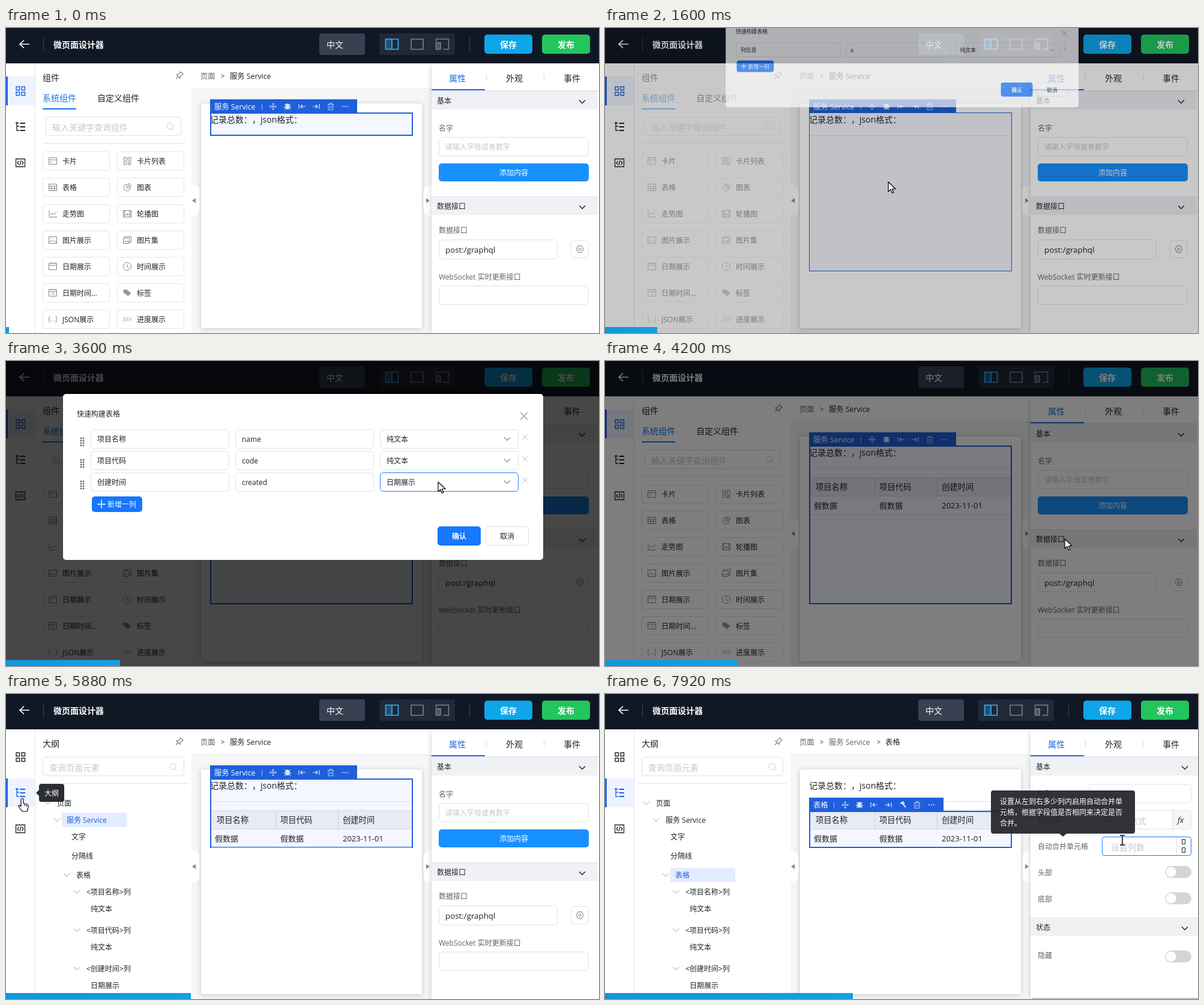
Write an HTML page that moves like this. It is 988x509 px and loops after 8 s.

```html
<!DOCTYPE html>
<html lang="zh">
<head>
<meta charset="utf-8">
<style>
html,body{margin:0;width:100%;height:100%;overflow:hidden;background:#fff}
svg{display:block;width:988px;height:509px;font-family:"Open Sans","Noto Sans CJK SC","Noto Sans CJK",sans-serif;text-spacing-trim:space-all}
</style>
</head>
<body>
<svg id="stage" viewBox="0 0 988 509" xmlns="http://www.w3.org/2000/svg">
  <defs>
    <filter id="soft" x="-10%" y="-10%" width="120%" height="120%"><feDropShadow dx="0" dy="1" stdDeviation="4" flood-opacity=".2"/></filter>
    <linearGradient id="bar"><stop offset="0" stop-color="#1296db"/><stop offset="1" stop-color="#139fe6"/></linearGradient>
  </defs>
</svg>
<script>
const LOOP = 8000, BLUE = '#1f5fdc', INK = '#1f2329', GREY = '#606266', HINT = '#c4c8d0', EDGE = '#dfe1e6';

// Drawing helpers: text is placed by its vertical centre
const rect = (x, y, w, h, fill, more = '') => `<rect x="${x}" y="${y}" width="${w}" height="${h}" fill="${fill}" ${more}/>`;
const box = (x, y, w, h, stroke = EDGE, fill = '#fff', r = 4) =>
  rect(x + .5, y + .5, w - 1, h - 1, fill, `stroke="${stroke}" rx="${r}"`);
const line = (d, stroke = INK, width = 1, more = '') =>
  `<path d="${d}" fill="none" stroke="${stroke}" stroke-width="${width}" ${more}/>`;
const shape = (d, fill, more = '') => `<path d="${d}" fill="${fill}" ${more}/>`;
const dot = (x, y, r, fill, more = '') => `<circle cx="${x}" cy="${y}" r="${r}" fill="${fill}" ${more}/>`;
const text = (x, y, s, size = 12, fill = INK, more = '') =>
  `<text x="${x}" y="${y + size * .4}" font-size="${size}" fill="${fill}" ${more}>${s.replace(/</g, '&lt;')}</text>`;
const centred = (x, y, s, size, fill, more = '') => text(x, y, s, size, fill, 'text-anchor="middle" ' + more);
const at = (x, y, s, more = '') => `<g transform="translate(${x} ${y})" ${more}>${s}</g>`;
const fade = (o, s) => o <= 0 ? '' : `<g opacity="${o.toFixed(3)}">${s}</g>`;
const chevron = (x, y, c = INK, w = 1.5, r = 5) => line(`M${x - r} ${y - r / 2}l${r} ${r}l${r} ${-r}`, c, w);

// Timing helpers
const ramp = (t, a, b) => Math.max(0, Math.min(1, (t - a) / (b - a)));
const within = (t, a, b) => t >= a && t < b;

function header() {
  return rect(0, 0, 988, 59, '#111825') +
    line('M39 27H24M30 20.5l-7 6.500 7 6.500', '#fff', 1.7) + line('M62.500 15v24', '#3b4351') +
    text(79, 27, '微页面设计器', 14, '#fff', 'font-weight="700"') +
    rect(522, 9, 76, 36, '#374151', 'rx="4"') + text(534, 27, '中文', 14, '#fff') +
    rect(622, 9, 126, 36, '#1f2937', 'rx="4"') +
    rect(633, 19, 10, 16, '#1e4f78') + line('M632.500 18.500h21v17h-21zM643 18.500v17', '#3cb2f5', 1.6) +
    line('M675 18.500h20v17h-20z', '#7b828e', 1.6) +
    rect(717, 25, 7, 10, '#4b5563') + line('M716.500 23v-4.500h21v17h-9M716.500 24.500h7.500v11h-7.500z', '#7b828e', 1.5) +
    line('M772.500 15v24', '#3b4351') +
    [[797, '#0ea5e9', '保存'], [893, '#22c55e', '发布']].map(([x, c, s]) =>
      rect(x, 11, 80, 32, c, 'rx="5"') + centred(x + 40, 27, s, 14, '#fff', 'font-weight="700"')).join('');
}

function rail(outline) {
  const y = outline ? 141 : 81, a = outline ? INK : BLUE, b = outline ? BLUE : INK;
  return rect(0, 59, 309, 450, '#fff') + rect(0, y, 48, 48, '#eef3ff') + rect(0, y, 3, 48, '#2563eb') +
    line('M48.500 59v450', '#e4e6ea') +
    line('M17 98h5.500v5.500h-5.500zM26 98h5.500v5.500h-5.500zM17 107h5.500v5.500h-5.500zM26 107h5.500v5.500h-5.500z', a, 1.4) +
    line('M18 158v13h4M18 164h4', b, 1.3) + line('M16 158.500h5M23.500 159h8.500M23.500 165h8.500M23.500 171h8.500', b, 2.2) +
    line('M16.500 218.500h15v13h-15zM21.500 222l-2.500 3 2.500 3M26.500 222l2.500 3-2.500 3M25 221l-2 8', INK, 1.3) +
    at(289, 79, line('M-6 6l4-4M-5-1l6 6 1-4 4-3-4-4-3 4z', '#777', 1.1));
}

const FRAME = 'M.500 1.500h13v11h-13z';
const ICONS = {
  卡片: FRAME + 'M.500 5h13M3 8.500h3',
  卡片列表: 'M1 1h5v5h-5zM8.500 1h4.500v7h-4.500zM1 8.500h5v4.500h-5zM8.500 10.500h4.500v2.500h-4.500z',
  表格: FRAME + 'M.500 5h13M.500 8.700h13M5 5v7.500M9.500 5v7.500',
  图表: 'M6 2a5.500 5.500 0 1 0 6 6h-6zM8.500.700a5 5 0 0 1 5 5h-5z',
  走势图: 'M1 1v11.500h13M3 9.500l3-3.500 3 2 4-4.500',
  轮播图: FRAME + 'M3 1.500v11M11 1.500v11M5 9l2-3 2 3zM0 4h3M0 9h3M11 4h3M11 9h3',
  图片展示: FRAME + 'M1 11l4-4 3 3 2.500-2 3 3M4 4.500h1',
  图片集: 'M.500 3.500h10v9h-10zM3 3.500v-2.500h10.500v9h-3M1 11l3-3 2 2 2-2 2 3',
  日期展示: FRAME + 'M.500 5h13M4 0v3M10 0v3',
  时间展示: 'M7 .500a6.500 6.500 0 1 0 .01 0zM7 3.500v4l3 1.500',
  '日期时间...': FRAME + 'M.500 5h13M4 0v3M10 0v3M7 6.500v3h2.500',
  标签: 'M.500 1.500h6l7 6-5 5-8-6z',
  JSON展示: 'M2.500 2q-1.500 0-1.500 2v1.500L0 7l1 1.500v2q0 2 1.500 2M11.500 2q1.500 0 1.500 2v1.500L14 7l-1 1.500v2q0 2-1.500 2M3.500 9h1M6.500 9h1M9.500 9h1',
  进度展示: 'M0 3.500l3.500 3.500L0 10.500M5 3.500l3.500 3.500L5 10.500M10 3.500l3.500 3.500-3.500 3.500'
};
const card = (x, y, name, edge = '#e3e5e9') => box(x, y, 112, 32, edge) +
  at(x + 10, y + 9, name === '标签' ? shape(ICONS[name], '#999') : line(ICONS[name], '#82868c')) + text(x + 33, y + 16.300, name);
const search = (x, w, hint) => box(x, w > 230 ? 105 : 148, w, 32) + text(x + 11, w > 230 ? 122 : 165, hint, 14, HINT) +
  at(x + w - 19, w > 230 ? 121 : 164, line('M0-5a5 5 0 1 0 .01 0M4 4l2.500 2.500', HINT));

const palette = () => text(61, 82, '组件', 14) + text(61, 116, '系统组件', 14, '#1677e8') + rect(61, 134, 56, 2, '#1677e8') +
  text(152, 116, '自定义组件', 14) + search(66, 226, '输入关键字查询组件') + line('M61 192.500h237', EDGE) +
  Object.keys(ICONS).map((n, i) => card(61 + i % 2 * 124, 206 + (i >> 1) * 44, n)).join('');

const treeRow = ([x, y, s, open], marked) => (marked ? rect(x - 8, y - 12, 108, 24, '#e3edff') : '') +
  (open ? chevron(x - 16, y, '#9a9da3', 1) : '') + text(x, y, s, 12, marked ? BLUE : INK);
const TREE = [[85, 182, '页面', 1], [101, 210, '服务 Service', 1], [109, 238, '文字'], [109, 270, '分隔线'], [117, 302, '表格', 1],
  ...['项目名称', '项目代码', '创建时间'].flatMap((s, i) =>
    [[134, 330 + i * 64, `<${s}>列`, 1], [141, 358 + i * 64, i < 2 ? '纯文本' : '日期展示']])];
const outlineTop = text(61, 82, '大纲', 14) + search(61, 236, '查询页面元素') + line('M55 149.500h248', EDGE);
const outline = marked => outlineTop + TREE.map(r => treeRow(r, r[2] === marked)).join('');
const dropOutline = () => outlineTop + text(61, 177, '将目标拖入导航中的节点可以切换容器', 14, '#79b59c') +
  [[85, 219, '页面', 1], [101, 247, '内容区', 1], [117, 275, '服务 Service', 1], [133, 303, '内容区', 1]]
    .map((r, i) => treeRow(r, i > 1)).join('');

const TOOLS = {
  move: line('M-5 0h10M0-5v10M-2-3.500l2-2 2 2M-2 3.500l2 2 2-2M-3.500-2l-2 2 2 2M3.500-2l2 2-2 2', '#dce7ff'),
  bug: line('M-5-4l3 2M5-4l-3 2M-6 1h12M-5 5l3-2M5 5l-3-2', '#dce7ff', 1.3) + '<ellipse rx="3.500" ry="5" fill="#dce7ff"/>',
  first: line('M-5-4v8M6 0h-8M1-3l-3 3 3 3', '#dce7ff', 1.2),
  last: line('M5-4v8M-6 0h8M-1-3l3 3-3 3', '#dce7ff', 1.2),
  hammer: line('M-4-2l4-3 3 3M-1-3l6 7', '#dce7ff', 2),
  bin: line('M-5-3.500h10M-2-3.500v-2h4v2M-4-3.500v9h8v-9M-1.500-1v4M1.500-1v4', '#b9cdfa'),
  more: dot(-4, 0, 1, '#dce7ff') + dot(0, 0, 1, '#dce7ff') + dot(4, 0, 1, '#dce7ff')
};
function toolbar(y, label, width, tools = 'move bug first last bin more') {
  const names = tools.split(' '), start = 375 + width;
  return rect(340, y, start - 320 + 24 * (names.length - 1), 23, BLUE) + text(347, y + 12, label, 12.3, '#fff') +
    line(`M${start - 18.500} ${y + 8}v10`, '#8fb0f5') + names.map((n, i) => at(start + i * 24, y + 12, TOOLS[n])).join('');
}
const selection = (y, h, fill = '#f4f7ff', w = 2) => rect(340 + w / 2, y + w / 2, 338 - w, h - w, fill, `stroke="${BLUE}" stroke-width="${w}"`);
const summary = () => text(340, 152, '记录总数：，json格式：', 14);
const table = () => rect(342, 195, 334, 30, '#e8ebf4') + line('M342 194.500h334M342 225.500h334M342 256.500h334', '#d5d9e2') +
  line('M449.500 195v30M553.500 195v30', '#cbd0da') +
  [[351, '项目名称', 348, '假数据'], [457, '项目代码', 457, '假数据'], [561, '创建时间', 561, '2023-11-01']]
    .map(([x, h, v, s]) => text(x, 210, h, 13.300) + text(v, 241, s, 13)).join('');
const empty = () => '<ellipse cx="509" cy="304" rx="33" ry="17" fill="#a9c1e9"/><ellipse cx="509" cy="301" rx="32" ry="15" fill="#bed0f0"/>' +
  shape('M489 291q2-20 13-20 9 3 12 22l-5 14q-15-1-20-16zM507 274q12-4 17 8 3 12-7 22z', '#9db6e0') +
  line('M497 276q4 14 12 29M511 278q6 12 2 24', '#d3dff6', 4) + centred(509, 342, '暂无数据', 13, '#9dadcf');

function canvas(t) {
  const tableOn = t >= 6520;
  let s = rect(309, 59, 400, 450, '#f5f6f7') + rect(309, 59, 400, 42, '#fff') + line('M309 101.500h400', '#e6e8eb') +
    text(324, 80, '页面', 12.3, GREY) + text(358, 80, '>', 11) + text(373, 80, '服务 Service', 12.3, tableOn ? GREY : INK) +
    (tableOn ? text(453, 80, '>', 11) + text(467, 80, '表格', 12.3) : '') + rect(325, 126, 368, 375, '#fff', 'filter="url(#soft)"');
  const rule = line('M342 179.500h334', '#dcdfe6'), service = () => toolbar(119, '服务 Service', 70);
  if (t < 450) s += selection(141, 39) + summary() + service();
  else if (t < 940) s += selection(141, 265) + rule + summary() + empty() + service();
  else if (t < 1400) s += rect(340, 141, 338, 23, '#f4f7ff') + line('M340 163.500h338M340 177.500h338M340 179.500h338', '#c9cfdd') +
    selection(141, 265, 'none', 1) + summary() + selection(194, 212, '#d3dff7') + rect(341, 195, 336, 10, '#c5d2ef') +
    line('M341 205.500h336', '#aebfe3') + rect(471, 142, 76, 18, BLUE, 'rx="2"') + text(479, 151, '内容区', 11, '#fff') +
    line('M519.500 147v9', '#a9c3fa') + at(533, 151, line('M-5 0l5 5 2-3-4-4zM0-2l4-3 1 2-3 4', '#dce7ff')) + empty();
  else if (t < 4000) s += selection(141, 265, '#f4f7ff', t < 1700 ? 1 : 2) + rule + summary() + service();
  else if (t < 6520) {
    const nested = within(t, 4750, 5150);
    s += selection(141, t < 5150 ? 265 : 116) + rule + summary() + table() +
      (nested ? selection(257, 149, '#eef3ff') + toolbar(234, '内容区', 37) : service());
  } else s += summary() + rule + selection(195, 62) + table() + selection(195, 62, 'none') +
    toolbar(173, '表格', 25, 'move bug first last hammer bin more');
  return s + shape('M309 262q13 0 13 10v32q0 10-13 10z', '#fff') + shape('M316 284v8l-6-4z', '#888') +
    shape('M709 262q-13 0-13 10v32q0 10 13 10z', '#fff') + shape('M700 284v8l6-4z', '#888');
}

const section = (y, s, w) => rect(709, y, w, 31, '#f0f1f4') + line(`M709 ${y + .5}h${w}`, '#e3e5e9') +
  text(718, y + 16, s, 12, INK, 'font-weight="500"') + chevron(w + 683, y + 18);
const toggle = y => rect(933, y, 44, 20, '#d3d5d9', 'rx="10"') + dot(943, y + 10, 8.5, '#fff');

function inspector(t) {
  let s = rect(709, 59, 279, 450, '#fff', 'filter="url(#soft)"') + text(738, 83, '属性', 14, '#1668dc') +
    text(833, 83, '外观', 14) + text(929, 83, '事件', 14) + line('M800.500 77v11M896.500 77v11', '#d5d7db') +
    line('M709 104.500h279', '#e6e8eb') + rect(709, 102, 89, 2, '#2563eb');
  if (t < 6560) return s + section(105, '基本', 277) + text(721, 167, '名字', 12, GREY) + box(721, 182, 250, 32, EDGE, '#fff', 5) +
    text(732, 198, '请输入字母或者数字', 12, HINT) + rect(721, 226, 250, 30, within(t, 300, 520) ? '#40a9ff' : '#1890ff', 'rx="5"') +
    centred(846, 241, '添加内容', 12, '#fff') + section(281, '数据接口', 277) + text(721, 337, '数据接口', 12, GREY) +
    box(721, 353, 198, 33, EDGE, '#fff', 5) + text(732, 370, 'post:/graphql', 13.3) + box(941, 354, 30, 30, EDGE, '#fff', 5) +
    at(956, 369, line('M-6 0l3-5.500h6l3 5.500-3 5.500h-6zM0-2a2 2 0 1 0 .01 0', '#777')) +
    text(721, 415, 'WebSocket 实时更新接口', 12, GREY) + box(721, 430, 250, 32, EDGE, '#fff', 5);
  const hover = t >= 7650;
  return s + section(105, '基本', 283) + text(721, 166, '标题', 12, GREY) + box(806, 150, 171, 32) +
    text(721, 210, '数据源', 12, GREY) + box(806, 194, 171, 32) + text(818, 211, '请输入表达式', 14, HINT) +
    box(945, 194, 32, 32, EDGE, '#f5f6f8') + text(954, 210, 'fx', 13, INK, 'font-style="italic"') +
    text(721, 254, '自动合并单元格', 12, GREY) + box(828, 238, 149, 32, hover ? '#1677ff' : EDGE) + text(843, 255, '设置列数', 14, HINT) +
    (hover ? line('M952.500 239v30M953 254.500h23', '#dfe1e6') + line('M961.500 242.500h5v8h-5zM961.500 256.500h5v8h-5z') : '') +
    text(721, 298, '头部', 12, GREY) + toggle(287) + text(721, 342, '底部', 12, GREY) + toggle(331) +
    section(373, '状态', 283) + text(721, 436, '隐藏', 12, GREY) + toggle(428) + rect(711, 507, 277, 2, '#c9cbcf');
}

function tips(t) {
  const help = ['设置从左到右多少列内启用自动合并单', '元格，根据字段值是否相同来决定是否', '合并。'];
  return fade(ramp(t, 5480, 5560) * (1 - ramp(t, 6150, 6250)), rect(55, 150, 42, 30, '#2b2d31', 'rx="4"') +
      shape('M55 160l-5 5 5 5z', '#2b2d31') + text(64, 165, '大纲', 12, '#fff')) +
    fade(.94 * ramp(t, 7300, 7420), rect(643, 161, 240, 72, '#25272c', 'rx="4"') + shape('M757 233h12l-6 5z', '#25272c') +
      help.map((s, i) => text(658, 179 + i * 18, s, 12, '#fff')).join(''));
}

// Each cell: value before, value typed, start, end
const CELLS = [
  [['列信息', '项目名称', 2820, 2950], ['a', 'name', 2960, 3060]],
  [['', '项目代码', 3080, 3190], ['', 'code', 3200, 3300]],
  [['', '创建时间', 3320, 3420], ['', 'created', 3430, 3520]]
];
function dialog(t) {
  const rows = t < 2320 ? 1 : t < 2710 ? 2 : 3, x0 = rows > 1 ? 141 : 118, w = (834 - x0) / 3, extra = 36 * (rows - 1);
  let s = rect(95, 55, 800, 205 + extra, '#fff', 'rx="5"') + text(118, 88, '快速构建表格', 12) +
    line('M857 86l12 12M869 86l-12 12', '#999', 1.2);
  for (let i = 0; i < rows; i++) {
    const y = 114 + i * 36;
    if (rows > 1) for (let k = 0; k < 8; k++) s += dot(125 + k % 2 * 4, y + 15 + (k >> 1) * 4, 1.4, '#666');
    CELLS[i].forEach(([old, typed, a, b], j) => {
      const x = x0 + j * (w + 10), value = t < a ? old : typed.slice(0, Math.ceil(typed.length * ramp(t, a, b)));
      s += box(x, y, w, 32, within(t, a, b) ? '#1677ff' : EDGE, '#fff', 5) +
        text(x + 11, y + 16.300, value || ['标题', '绑定字段名'][j], 12, value ? INK : HINT);
    });
    const x = x0 + 2 * (w + 10);
    s += box(x, y, w, 32, i === 2 && within(t, 3530, 3640) ? '#1677ff' : EDGE, '#fff', 5) +
      text(x + 11, y + 16.300, i === 2 && t > 3600 ? '日期展示' : '纯文本') + chevron(835, y + 16, '#888', 1.2) +
      line(`M861 ${y + 9}l8 8M869 ${y + 9}l-8 8`, '#bbb');
  }
  const by = 154 + extra, fy = 204 + extra;
  return s + rect(x0 + 2, by, 84, 26, within(t, 2200, 2760) ? '#409eff' : '#1677ff', 'rx="5"') +
    line(`M${x0 + 11} ${by + 13}h14M${x0 + 18} ${by + 6}v14`, '#fff', 1.4) + text(x0 + 28, by + 13.300, '新增一列', 12, '#fff') +
    rect(719, fy, 72, 32, '#1677ff', 'rx="5"') + centred(755, fy + 16.300, '确认', 12, '#fff', 'font-weight="600"') +
    box(799, fy, 72, 32, EDGE, '#fff', 5) + centred(835, fy + 16.300, '取消', 12, INK);
}
function modal(t) {
  const shade = .72 * ramp(t, 1540, 1745) * (1 - ramp(t, 4120, 4390));
  const open = 1 - Math.pow(1 - ramp(t, 1540, 1700), 2.3), p = open * (1 - ramp(t, 3960, 4120));
  const k = .2 + .8 * p;
  return fade(shade, rect(0, 0, 988, 509, '#000')) +
    fade(p, at(495, -222, dialog(t), `style="transform:translate(495px,-222px) scale(${k}) translate(-495px,222px)"`));
}

const PATH = [[120, 985, 330], [350, 850, 245], [500, 850, 245], [820, 153, 260], [870, 160, 260], [1000, 408, 264], [1250, 472, 257],
  [1750, 472, 257], [2240, 183, 170], [2340, 183, 170], [2500, 183, 207], [2740, 183, 207], [2830, 240, 132], [2960, 440, 132],
  [3080, 240, 166], [3200, 440, 166], [3320, 240, 202], [3430, 440, 202], [3540, 720, 202], [3640, 720, 202], [3840, 766, 297],
  [4250, 766, 297], [4680, 470, 340], [4850, 470, 340], [5060, 508, 246], [5200, 508, 246], [5540, 27, 166], [5700, 27, 166],
  [5860, 27, 174], [6180, 27, 174], [6460, 130, 303], [6620, 130, 303], [7150, 760, 255], [7480, 760, 255], [7740, 862, 244], [8000, 862, 244]];
const PRESSED = [[380, 480], [800, 1400], [2260, 2340], [2560, 2700], [3850, 3950], [4700, 4780], [5080, 5160], [5560, 5660], [6480, 6580]];
const HANDS = [[300, 520], [2200, 2760], [3780, 3960], [5060, 5200], [5480, 6620]];

function pointer(t) {
  if (t < 120) return '';
  const i = Math.max(1, PATH.findIndex(k => k[0] > t)), [a, ax, ay] = PATH[i - 1], [b, bx, by] = PATH[i];
  const u = ramp(t, a, b), e = u * u * (3 - 2 * u), x = ax + (bx - ax) * e, y = ay + (by - ay) * e;
  const any = list => list.some(([p, q]) => within(t, p, q)), drag = within(t, 860, 1400);
  const ink = 'stroke="#000" stroke-width="1.200" stroke-linejoin="round"';
  let s = any(PRESSED) ? dot(0, 1, 12, '#f2ee2c', 'opacity=".75"') : '';
  if (t >= 7650 || within(t, 2800, 3520)) {
    const beam = 'M-4-8h3q1 0 1 1v14q0 1-1 1h-3M4-8h-3q-1 0-1 1v14q0 1 1 1h3';
    s += line(beam, '#fff', 3.5) + line(beam, '#000', 1.6);
  } else if (any(HANDS)) s += shape('M-2 1.500Q0-1 2 1.500v7l6 1.500q2 1 2 3v3l-2 6h-8l-5-7q-2-3 0-3.500l3 2z', '#fff', ink) + line('M4 10v3M7 11v3', '#000');
  else s += shape('M0 0v16l4-3.500 2.500 6 2.500-1-2.500-6h5.500z', '#fff', ink);
  if (drag) s += rect(10.5, 19.5, 10, 10, '#fff', 'stroke="#000"') + line('M15.500 21.500v6M12.500 24.500h6', '#000', 1.5);
  return (drag ? fade(.82, card(x - 92, y - 11, '表格', '#5b9cff')) : '') + at(x.toFixed(2), y.toFixed(2), s);
}

function sidebar(t) {
  const dropping = within(t, 980, 1500), outlined = t >= 5620;
  const content = dropping ? fade(.12 + .88 * ramp(t, 1010, 1180), dropOutline())
    : outlined ? fade(ramp(t, 5600, 5720), outline(t < 6520 ? '服务 Service' : '表格'))
    : fade(t < 980 ? 1 : .45 + .55 * ramp(t, 1610, 1750), palette());
  return rail(dropping || outlined) + content;
}

const layers = [canvas, sidebar, inspector, header, tips, modal,
  t => rect(0, 499, Math.round(5 + t * .0515), 10, 'url(#bar)'), pointer]
  .map(draw => ({ draw, node: document.getElementById('stage').appendChild(document.createElementNS('http://www.w3.org/2000/svg', 'g')) }));

function update(now) {
  const t = now % LOOP;
  for (const layer of layers) {
    const markup = layer.draw(t);
    if (markup !== layer.markup) layer.node.innerHTML = layer.markup = markup;
  }
}
const origin = performance.now();
function tick() {
  update(performance.now() - origin);
  requestAnimationFrame(tick);
}
tick();
</script>
</body>
</html>
```
